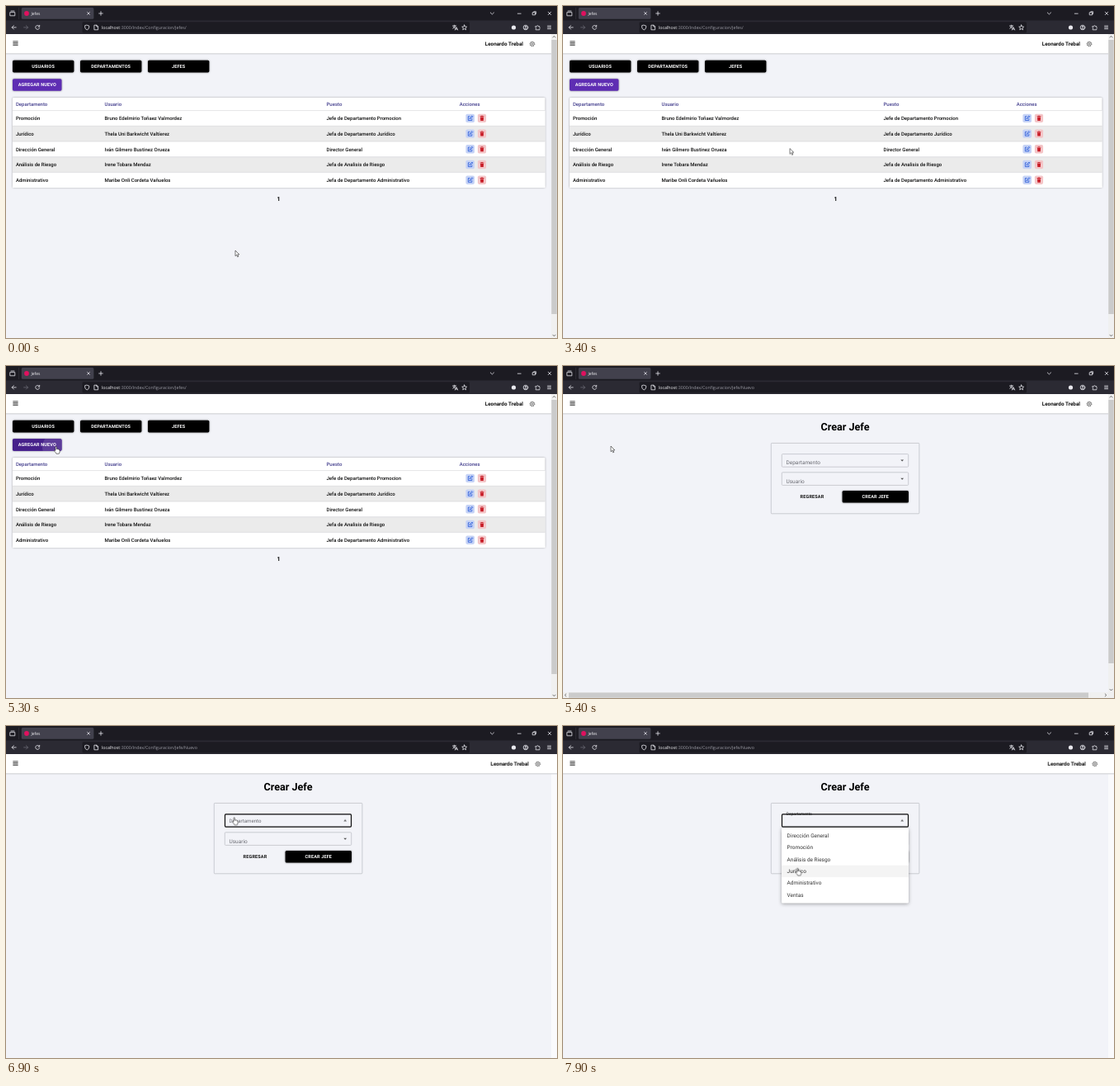
Animation, 668 px wide and 402 px high, one loop 8000 ms. Source, as an HTML page:

```html
<!DOCTYPE html>
<html lang="es">
<head>
<meta charset="utf-8">
<title>Jefes</title>
<style>
html, body { margin: 0; width: 100%; height: 100%; overflow: hidden; background: #f2f3f8; }
svg { display: block; width: 668px; height: 402px; }
text { font-family: Roboto, sans-serif; text-rendering: geometricPrecision; white-space: pre; }
.ui text { font-family: "Open Sans", "Noto Sans", sans-serif; fill: #f5f5f8; }
.line { fill: none; stroke: #e8e8ee; stroke-width: .8; stroke-linecap: round; stroke-linejoin: round; }
.cell { font-size: 6px; font-weight: 500; fill: #111; }
.head { fill: #46418f; }
.caps { font-size: 5.5px; font-weight: 700; letter-spacing: .02857em; text-anchor: middle; fill: #fff; }
.raised { filter: drop-shadow(0 .9px .8px rgba(0, 0, 0, .45)); }
.field { fill: none; stroke: #b9bac2; stroke-width: .7; }
.label { font-size: 6.5px; fill: #6a6b72; }
.option { font-size: 6.48px; fill: #333; }

#list, #form, #listBars, #formBars, #urlList, #urlForm, #name, #arrow, #hand, #cursor,
#ripple, #addHover, #focus, #caret, #label, #menu, #hover {
  animation: 8s step-end infinite;
}
#list, #listBars, #urlList { animation-name: listView; }
#form, #urlForm { animation-name: formView; }
#formBars { animation-name: formBars; }
#name { animation-name: widen; }
#focus { animation-name: focus; }
#caret { animation-name: flip; transform-origin: 411.2px 114.4px; }
#label { animation-name: float; }
#menu { animation-name: grow; transform-origin: 342px 123px; }
#hover { animation-name: hover; }
#addHover { animation-name: addHover; }
#ripple { animation-name: ripple; }
#arrow { animation-name: arrow; }
#hand { animation-name: hand; }
#cursor { animation-name: travel; }

@keyframes listView { 0% { opacity: 1 } 67.5%, 100% { opacity: 0 } }
@keyframes formView { 0% { opacity: 0 } 67.5%, 100% { opacity: 1 } }
@keyframes formBars { 0% { opacity: 0 } 67.5% { opacity: 1 } 86.25%, 100% { opacity: 0 } }
@keyframes widen { 0% { transform: none } 86.25%, 100% { transform: translateX(6.7px) } }
@keyframes focus { 0% { opacity: 0 } 86.25%, 100% { opacity: 1 } }
@keyframes flip { 0% { transform: none } 86.25%, 100% { transform: scaleY(-1) } }
@keyframes float {
  0% { transform: translate(270.5px, 119.4px) }
  86.25% { transform: translate(270.5px, 116.5px) scale(.94) }
  87.5% { transform: translate(270.7px, 109.4px) scale(.79); fill: #222 }
  88.75%, 100% { transform: translate(270.8px, 107.8px) scale(.75); fill: #222 }
}
@keyframes grow {
  0% { opacity: 0; transform: scale(.75, .56) }
  87.5% { opacity: .35; transform: scale(.87, .76) }
  88.75% { opacity: .85; transform: scale(.97, .95) }
  90%, 100% { opacity: 1; transform: none }
}
@keyframes hover {
  0% { opacity: 0; transform: none }
  95% { opacity: 1; transform: none }
  96.25% { opacity: 1; transform: translateY(14.35px) }
  97.5% { opacity: 1; transform: translateY(28.7px) }
  98.75%, 100% { opacity: 1; transform: translateY(43.05px) }
}
@keyframes addHover {
  0% { opacity: 0 } 56.25% { opacity: .4 } 57.5% { opacity: .8 }
  58.75% { opacity: 1 } 67.5%, 100% { opacity: 0 }
}
@keyframes ripple { 0% { opacity: 0 } 66.25% { opacity: .13 } 67.5%, 100% { opacity: 0 } }
@keyframes arrow {
  0% { opacity: 1 } 47.5% { opacity: 0 } 50% { opacity: 1 } 56.25% { opacity: 0 }
  67.5% { opacity: 1 } 83.75%, 100% { opacity: 0 }
}
@keyframes hand {
  0% { opacity: 0 } 47.5% { opacity: 1 } 50% { opacity: 0 } 56.25% { opacity: 1 }
  67.5% { opacity: 0 } 83.75%, 100% { opacity: 1 }
}
@keyframes travel {
  0% { transform: translate(278px, 296px) }
  2.5% { transform: translate(278px, 296px); animation-timing-function: steps(2) }
  5% { transform: translate(327.5px, 282px) }
  7.5% { transform: translate(327.5px, 282px); animation-timing-function: steps(2) }
  10% { transform: translate(342.8px, 282.2px) }
  28.75% { transform: translate(343.3px, 282.6px) }
  36.25% { transform: translate(343.3px, 282.6px); animation-timing-function: steps(3) }
  40% { transform: translate(315px, 240px); animation-timing-function: steps(4) }
  45% { transform: translate(235px, 105px); animation-timing-function: steps(2) }
  47.5% { transform: translate(210px, 74px); animation-timing-function: steps(4) }
  52.5% { transform: translate(121px, 95.7px); animation-timing-function: steps(3) }
  56.25% { transform: translate(66px, 97.5px); animation-timing-function: steps(2) }
  58.75% { transform: translate(58px, 97px) }
  71.25% { transform: translate(58px, 97px); animation-timing-function: steps(5) }
  77.5% { transform: translate(135.6px, 104.3px); animation-timing-function: steps(4) }
  82.5% { transform: translate(259px, 110px); animation-timing-function: steps(2) }
  85% { transform: translate(274px, 110.5px) }
  92.5% { transform: translate(274px, 110.5px); animation-timing-function: steps(5) }
  98.75%, 100% { transform: translate(281.6px, 171.8px) }
}
</style>
</head>
<body>
<svg viewBox="0 0 668 402">
  <defs>
    <clipPath id="addClip"><rect x="8" y="88.3" width="59.5" height="14.4" rx="1.6"/></clipPath>
    <g id="edit">
      <rect width="10.6" height="10.4" rx="1.8" fill="#c6d3f5"/>
      <path d="M5 3H3V7.8H7.4V5.6M4.6 6.1 5 4.8 7.6 2.2 8.5 3.1 5.9 5.7Z" fill="none" stroke="#2356d8" stroke-width=".8"/>
    </g>
    <g id="trash">
      <rect width="10.2" height="10.4" rx="1.8" fill="#f3c6c8"/>
      <path d="M2.8 2.6H4.2L4.5 2.1H5.8L6.1 2.6H7.5V3.4H2.8ZM3.1 3.9H7.2L6.9 8.2H3.4Z" fill="#c81e28"/>
    </g>
    <g id="gear" fill="none" stroke="#555">
      <circle r="2.3" stroke-width=".7"/>
      <circle r="2.9" stroke-width=".8" stroke-dasharray="1.1 1.18"/>
      <circle r=".9" stroke-width=".6"/>
    </g>
    <path id="tri" d="M-1.9-.9H1.9L0 1.1Z" fill="#505050"/>
  </defs>

  <rect width="668" height="402" fill="#f2f3f8"/>
  <rect x="661" y="58" width="7" height="344" fill="#fafafc"/>

  <g id="list">
    <g id="nav"></g>
    <g class="raised"><rect x="8" y="88.3" width="59.5" height="14.4" rx="1.6" fill="#5e2db3"/></g>
    <rect id="addHover" x="8" y="88.3" width="59.5" height="14.4" rx="1.6" fill="#46208a"/>
    <g clip-path="url(#addClip)"><circle id="ripple" cx="60" cy="98" r="16" fill="#fff"/></g>
    <text class="caps" x="37.8" y="97.4">AGREGAR NUEVO</text>
    <g style="filter:drop-shadow(0 .5px .8px rgba(0,0,0,.35))"><rect x="8" y="111" width="645.5" height="109" rx="1.2" fill="#fff"/></g>
    <g id="table"></g>
    <text x="330.6" y="235.7" font-size="7" font-weight="700" text-anchor="middle">1</text>
  </g>

  <g id="form">
    <text x="342" y="77.6" font-size="12.6" font-weight="700" text-anchor="middle">Crear Jefe</text>
    <rect class="field" x="252.3" y="93.4" width="179.6" height="85.4" rx=".8"/>
    <rect class="field" x="265.3" y="106.6" width="153.4" height="15.6" rx="1"/>
    <rect class="field" x="265.3" y="128.8" width="153.4" height="15.6" rx="1"/>
    <text class="label" id="label">Departamento</text>
    <text class="label" x="270.5" y="141.8">Usuario</text>
    <g id="caret"><use href="#tri" x="411.2" y="114.4"/></g>
    <use href="#tri" x="411.2" y="136.7"/>
    <text class="caps" x="302" y="160.2" style="fill:#111">REGRESAR</text>
    <g class="raised"><rect x="338.6" y="151" width="80.4" height="14.6" rx="1.6"/></g>
    <text class="caps" x="378.8" y="160.2">CREAR JEFE</text>
    <rect id="focus" x="265.5" y="106.9" width="153" height="15.2" rx="1" fill="none" stroke="#111" stroke-width="1.2"/>
    <g id="menu">
      <g style="filter:drop-shadow(0 1.6px 2px rgba(0,0,0,.35))"><rect x="265" y="123" width="154" height="91.6" rx="1.6" fill="#fff"/></g>
      <rect id="hover" x="265" y="125.6" width="154" height="14.35" fill="#f4f4f4"/>
      <g id="options"></g>
    </g>
  </g>

  <rect y="57" width="668" height="1.3" fill="#c4c5ca"/>
  <rect y="34" width="668" height="23.4" fill="#fff"/>
  <path d="M8.4 42.8H14.6M8.4 44.4H14.6M8.4 46H14.6M8.4 47.6H14.6" stroke="#555" stroke-width="1"/>
  <g id="name">
    <text x="627" y="48.3" font-size="6.35" font-weight="700" text-anchor="end" fill="#111">Leonardo Trebal</text>
    <use href="#gear" x="638" y="46"/>
  </g>

  <g id="listBars">
    <rect x="661" y="34" width="7" height="368" fill="#f0f0f0"/>
    <rect x="661.3" y="41" width="6.4" height="332" fill="#cbcbcb"/>
    <path class="line" style="stroke:#555" d="M663 38 664.5 36.4 666 38M663 398.2 664.5 399.8 666 398.2"/>
  </g>
  <g id="formBars">
    <path d="M661 34H668V402H0V395H661Z" fill="#f0f0f0"/>
    <path d="M661.3 41H667.7V360H661.3ZM7 395.4H637V401.7H7Z" fill="#cbcbcb"/>
    <path class="line" style="stroke:#555" d="M663 38 664.5 36.4 666 38M663 391.4 664.5 393 666 391.4M3.8 397 2.2 398.5 3.8 400M657.2 397 658.8 398.5 657.2 400"/>
  </g>

  <g class="ui">
    <rect width="668" height="18" fill="#1c1b22"/>
    <rect y="17.5" width="668" height="16.5" fill="#2b2a33"/>
    <rect x="18.8" y="2" width="87.6" height="13.8" rx="1.6" fill="#42414d"/>
    <rect x="92.5" y="19.3" width="469.5" height="13.2" rx="1.6" fill="#1c1b22"/>
    <path d="M15.6 2V16" stroke="#3a3943" stroke-width=".6"/>
    <circle cx="25" cy="9" r="2.9" fill="#e0115f"/>
    <text x="30.4" y="10.8" font-size="5">Jefes</text>
    <g font-size="5.25">
      <text x="116" y="27.9">localhost</text>
      <text id="urlList" x="138.3" y="27.9" style="fill:#9b9ba4">:3000/Index/Configuracion/Jefes/</text>
      <text id="urlForm" x="138.3" y="27.9" style="fill:#9b9ba4">:3000/Index/Configuracion/Jefe/Nuevo</text>
    </g>
    <path class="line" d="M5.2 7.6H10.8V11.8H5.2ZM6 6H10M98.6 7.5 101.4 10.3M101.4 7.5 98.6 10.3M115 6.7V11.3M112.7 9H117.3
      M587.3 8 589.4 10 591.5 8M620.3 9.2H624.2M638.6 7.8H641.6V10.8H638.6ZM639.8 7.6V6.8H642.6V9.6H641.8M657.3 7.2 660.7 10.6M660.7 7.2 657.3 10.6
      M12.2 25.9H7.2M9.4 23.7 7.2 25.9 9.4 28.1M40.4 24.5A2.5 2.5 0 1 0 40.7 26.6M40.7 23.3V25H39
      M98.2 23.2 100.7 24V26Q100.5 28 98.2 28.9 95.9 28 95.7 26V24ZM107.3 23.2H110L111.6 24.8V28.8H107.3ZM109.8 23.3V25H111.5
      M541.6 24H545.4M543.5 23.2V24M545 24Q544 26.6 541.8 27.2M542.3 24.8Q543 26.3 544.4 26.8M544.4 29 546 25.6 547.6 29M545 28H547
      M555.7 23 556.6 25 558.7 25.2 557.1 26.6 557.6 28.8 555.7 27.6 553.8 28.8 554.3 26.6 552.7 25.2 554.8 25Z
      M642.2 24.6H643.6A.9.9 0 0 1 645.4 24.6H646.8V26A.9.9 0 0 1 646.8 27.6V28.8H642.2V27.4A.8.8 0 0 0 642.2 25.9Z
      M656.6 24.1H660.6M656.6 25.9H660.6M656.6 27.7H660.6"/>
    <path class="line" style="stroke:#6b6a74" d="M21.6 25.9H26.6M24.4 23.7 26.6 25.9 24.4 28.1"/>
    <circle cx="615.5" cy="26" r="2.6" fill="#e8e8ee"/>
    <g class="line"><circle cx="630" cy="26" r="2.8"/><circle cx="630" cy="25.2" r=".8"/><path d="M628.3 27.8Q630 26.2 631.7 27.8"/></g>
  </g>

  <g id="cursor">
    <path id="arrow" d="M0 0V6.7L1.6 5.3 2.7 7.8 3.8 7.3 2.7 4.9H4.8Z" fill="#fff" stroke="#222" stroke-width=".6"/>
    <path id="hand" d="M2 5.4V1.2Q2 .4 2.7 .4T3.4 1.2V3.6Q4.4 3 4.7 3.9 5.7 3.4 6 4.3 7.1 4 7.1 5.2V6.8Q7 8.2 6.3 9.2H3Q2.4 7.8 .7 6.1 .3 5.2 1 5Q1.6 5 2 5.4Z" fill="#fff" stroke="#222" stroke-width=".6"/>
  </g>
</svg>
<script>
const fill = (id, items, draw) => {
  document.getElementById(id).innerHTML = items.map(draw).join('');
};

fill('nav', ['USUARIOS', 'DEPARTAMENTOS', 'JEFES'], (name, i) => {
  const x = 8 + 82 * i;
  return `<g class="raised"><rect x="${x}" y="65.8" width="74.4" height="14.6" rx="1.6"/></g>
    <text class="caps" x="${x + 37.2}" y="74.9">${name}</text>`;
});

const columns = [11.9, 119.5, 388.5];
const cells = (texts, y, cls = '') =>
  texts.map((t, i) => `<text class="cell ${cls}" x="${columns[i] ?? 549.7}" y="${y}">${t}</text>`).join('');

const rows = [
  ['Departamento', 'Usuario', 'Puesto', 'Acciones'],
  ['Promoción', 'Bruno Edelmirio Toñaez Valmordez', 'Jefe de Departamento Promocion'],
  ['Jurídico', 'Thela Uni Barkwicht Valtíerez', 'Jefa de Departamento Jurídico'],
  ['Dirección General', 'Iván Gilmero Bustinez Orueza', 'Director General'],
  ['Análisis de Riesgo', 'Irene Tobara Mendaz', 'Jefa de Analisis de Riesgo'],
  ['Administrativo', 'Maribe Onli Cordeta Vañuelos', 'Jefa de Departamento Administrativo']
];
fill('table', rows, (row, i) => {
  if (!i) return cells(row, 120.7, 'head');
  const top = 126.6 + 18.7 * (i - 1);
  return `<rect x="8" y="${top}" width="645.5" height="18.7" fill="${i % 2 ? '#fff' : '#ebebeb'}"/>
    <path d="M8 ${top}H653.5" stroke="#d2d2d6" stroke-width=".6"/>
    ${cells(row, top + 11.5)}
    <use href="#edit" x="557.4" y="${top + 4.1}"/><use href="#trash" x="571.9" y="${top + 4.1}"/>`;
});

fill('options', ['Dirección General', 'Promoción', 'Análisis de Riesgo', 'Jurídico', 'Administrativo', 'Ventas'],
  (name, i) => `<text class="option" x="271.6" y="${135 + 14.35 * i}">${name}</text>`);
</script>
</body>
</html>
```
